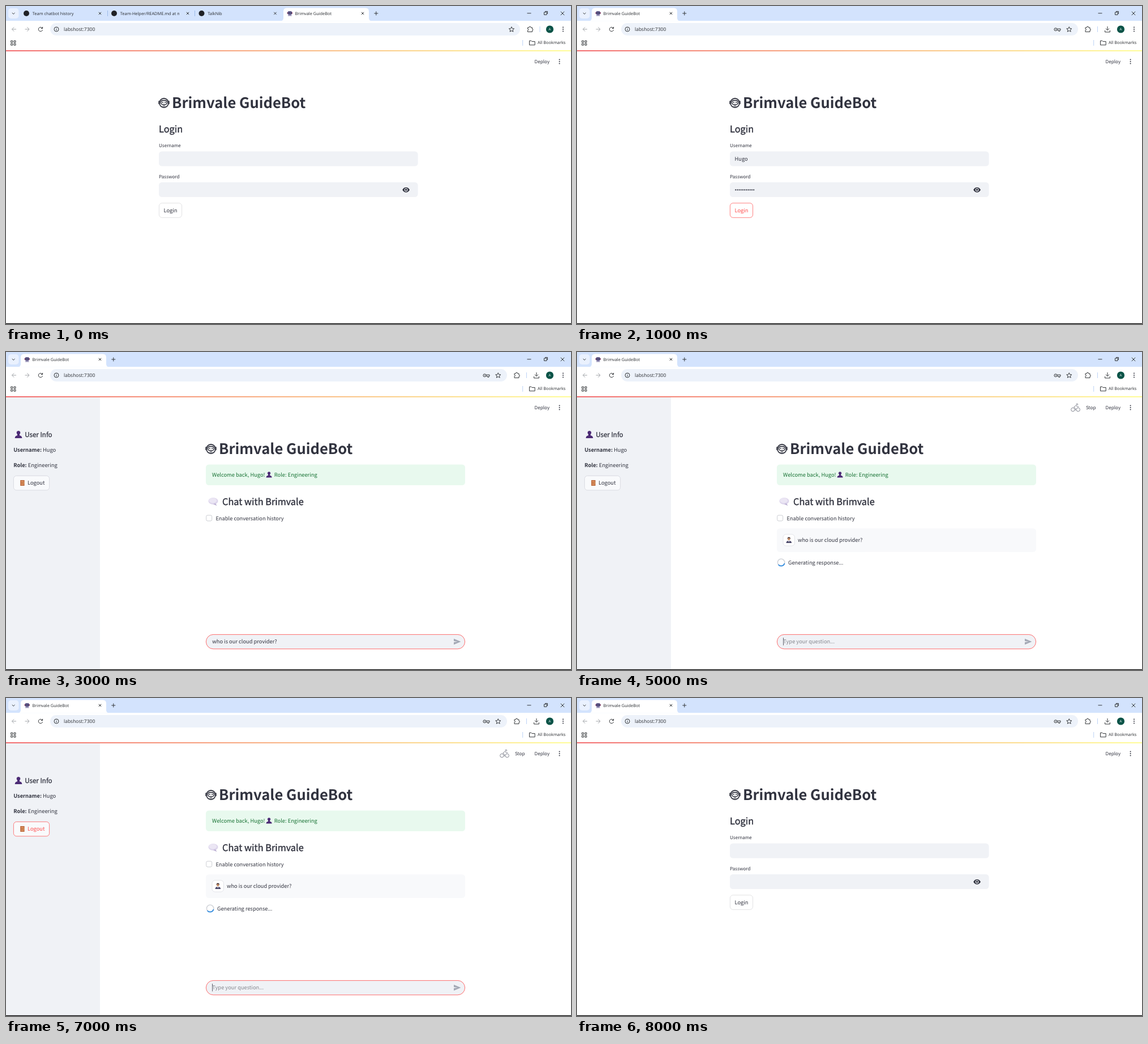
Write an HTML page that moves like this. It is 998 px wide and 561 px high and loops after 9000 ms.

```html
<!DOCTYPE html>
<html lang="en">
<head>
<meta charset="utf-8">
<title>Chat demo</title>
<style>
  html, body { margin: 0; width: 100%; height: 100%; overflow: hidden; background: #fff; }
  svg { display: block; width: 100vw; height: 100vh; }
  text {
    font-family: "Noto Sans CJK JP", "Noto Sans CJK SC", "Noto Sans CJK", "Noto Sans", sans-serif;
    fill: #31333f; text-rendering: geometricPrecision; white-space: pre;
  }
  .ui { font-family: "Open Sans", "Noto Sans", sans-serif; fill: #2a2d31; }
  .b { font-weight: 700; }
  /* Between regular and bold */
  .s { stroke: #31333f; stroke-width: .025em; }
  .line { fill: none; stroke: #333639; stroke-width: 1; }
</style>
</head>
<body>
<svg id="stage" viewBox="0 0 998 561" preserveAspectRatio="none"></svg>
<script>
const STEP = 1000, COUNT = 9;
const BOT = 'Brimvale GuideBot', USER = 'Hugo', INK = '#31333f', RED = '#ff4b4b';

const text = (x, y, str, size = 9.3, attrs = '') =>
  `<text x="${x}" y="${y}" font-size="${size}" ${attrs}>${str}</text>`;
const ui = (x, y, str, size = 7.4, attrs = '') => text(x, y, str, size, `class="ui" ${attrs}`);
const bold = str => `<tspan class="b">${str}</tspan>`;
const rect = (x, y, w, h, r, fill, attrs = '') =>
  `<rect x="${x}" y="${y}" width="${w}" height="${h}" rx="${r}" fill="${fill}" ${attrs}/>`;
const circle = (x, y, r, fill, attrs = '') => `<circle cx="${x}" cy="${y}" r="${r}" fill="${fill}" ${attrs}/>`;
const line = (d, attrs = '') => `<path class="line" d="${d}" ${attrs}/>`;
const shape = (d, fill) => `<path d="${d}" fill="${fill}"/>`;
const at = (x, y, body) => `<g transform="translate(${x} ${y})">${body}</g>`;
// Visible only in the listed steps.
const on = (steps, body) => `<g data-on="${steps}">${body}</g>`;
const dots = (x, y) => [-3.4, 0, 3.4].map(d => circle(x, y + d, 1, INK)).join('');
const cross = (x, y, r) => line(`M${x - r} ${y - r}l${2 * r} ${2 * r}m0 ${-2 * r}l${-2 * r} ${2 * r}`);

// Browser window
const tabShape = x => shape(`M${x - 5} 26.2q5 0 5-5V9.5q0-6 6-6h139q6 0 6 6v11.7q0 5 5 5z`, '#fff');
const botFace = (x, y) => at(x, y,
  shape('M-3.4 4.6q0-2.4 3.4-2.4t3.4 2.4z', '#8a84ad') + rect(-4.8, -2, 9.6, 2.8, 1, '#b3455c') +
  rect(-3.9, -3.8, 7.8, 6, 2.2, '#5a4f86') + rect(-3, -2.2, 6, 2.8, 1.2, '#2b2650') +
  circle(-1.4, -.8, .7, '#d9e4ff') + circle(1.4, -.8, .7, '#d9e4ff'));
const activeTab = x => tabShape(x) + botFace(x + 11.3, 13) + ui(x + 20.5, 15.8, BOT) + cross(x + 140, 13, 2.2) +
  line(`M${x + 160.3} 13h7m-3.5-3.5v7`);
const idleTab = (x, label) => circle(x, 13, 5, '#202226') +
  ui(x + 10.8, 15.8, label, 7.4, `clip-path="url(#tab${x})"`) + cross(x + 130, 13, 2.2);
const clip = x => `<clipPath id="tab${x}"><rect x="${x}" y="0" width="115" height="26"/></clipPath>`;

const star = x => line(`M${x} 36.7l1.3 3 3.3.3-2.5 2.1.8 3.2-2.9-1.7-2.9 1.7.8-3.2-2.5-2.1 3.3-.3z`);
const puzzle = x => line(`M${x - 4} 38h2.5q0-2 1.5-2t1.5 2H${x + 4}v2.6q1.4 0 1.4 1.2t-1.4 1.2v2.6h-8v-2.6q1.5-.1 1.5-1.3t-1.5-1.3z`, 'stroke-width="1.2"');
const divider = x => line(`M${x} 36v10`, 'style="stroke:#bdd3f6"');
const omnibox = w => rect(78, 30, w, 22, 11, '#edf2fa');

const browser =
  rect(0, 0, 998, 26.2, 0, '#d3e3fd') + rect(4, 4, 18.5, 18, 5, '#eaf1fe') +
  line('M10.8 12l2.4 2.3 2.4-2.3', 'stroke-width="1.3"') +
  on('0', idleTab(36, 'Team chatbot history') + idleTab(191, 'Team-Helper/README.md at main') + idleTab(345.5, 'TalkNib') +
    line('M179.5 8v10M333.5 8v10', 'style="stroke:#9dbbe9"') + activeTab(490)) +
  on('12345678', activeTab(26)) +
  line('M920.5 12.8h7M950.5 11h4.5v4.5h-4.5zm1.5-1.5h4.5v4.5') + cross(983, 13, 3.2) +
  line('M18 41h-7.5m3.7-3.7L10.5 41l3.7 3.7M33.5 41H41m-3.7-3.7L41 41l-3.7 3.7', 'style="stroke:#a2a5a9"') +
  line('M64.2 39.2a3.7 3.7 0 1 0 .4 2.9M64.6 36.8v2.8h-2.8', 'stroke-width="1.2"') +
  on('0', omnibox(830) + star(893) + puzzle(925.5) + divider(943)) +
  on('12345678', omnibox(807) + star(869.3) + puzzle(902) + divider(919.5) +
    circle(845.4, 41.3, 2.5, 'none', 'stroke="#333639"') + circle(845.4, 41.3, .8, '#333639') +
    line('M848 40.2h6v2.4h-1.2v1.8h-2v-1.8H848') +
    line('M937 36v6.5m-3-2.8l3 3 3-3M932.6 43v3h8.8v-3', 'stroke-width="1.2"')) +
  circle(89, 41, 4, 'none', 'stroke="#333639"') + line('M89 40.5v2.8M89 38.6v1') +
  ui(102, 44.3, 'labshost:7300', 8.5) +
  circle(960.5, 41, 6.6, '#0a5347') + ui(960.5, 43.1, 'A', 6, 'text-anchor="middle" style="fill:#fff"') + dots(984, 41) +
  line('M8.7 61.2h3v3h-3zm5.3 0h3v3h-3zm-5.3 5h3v3h-3zm5.3 0h3v3h-3z') +
  line('M912.7 60v10', 'style="stroke:#bdd3f6"') +
  line('M924.5 61.3h3.3l1.2 1.3h5.2v6.2h-9.7z') + ui(939, 67.4, 'All Bookmarks');

// Page parts
const robot = at(279, 171,
  circle(0, 0, 8, 'none', `stroke="${INK}" stroke-width="1.8"`) +
  shape('M-8-3.5h-1.7v5.5H-8zM8-3.5h1.7v5.5H8z', INK) +
  rect(-5.6, -4.4, 11.2, 7.2, 3.6, '#fff', `stroke="${INK}" stroke-width="1.6"`) +
  line('M-3.6-.2q1.2-2.4 2.4 0M1.2-.2q1.2-2.4 2.4 0', `style="stroke:${INK};stroke-width:1.3"`) +
  line('M-2.2 5.2h4.4', `style="stroke:${INK};stroke-width:1.2"`));
const heading = robot + text(293, 180.3, BOT, 25.6, 'class="b"');
const person = (x, y, scale = 1) => `<g transform="translate(${x} ${y}) scale(${scale})">` +
  shape('M-6.3 6.3q0-4 4.3-4.7l0-2Q-3.6-2-3.3-4-2.8-6.5 0-6.5T3.3-4Q3.6-2 2-.4v2q4.3.7 4.3 4.7z', '#4c2b75') + '</g>';
const field = y => rect(270, y, 457.6, 26, 5.2, '#f0f2f6');
const loginButton = (ink, edge) => rect(270.4, 347.7, 40.2, 25.6, 5.2, '#fff', `stroke="${edge}" stroke-width=".7"`) +
  text(290.5, 363.7, 'Login', 9.3, `text-anchor="middle" style="fill:${ink}"`);

const login = heading +
  text(270, 223.4, 'Login', 16.3, 'class="s"') +
  text(270, 249.4, 'Username', 8.14) + field(256.6) +
  text(270, 304, 'Password', 8.14) + field(311) +
  shape('M700.2 324.3q2.2-4.4 6.4-4.4t6.4 4.4q-2.2 4.4-6.4 4.4t-6.4-4.4z', INK) +
  circle(706.6, 324.3, 2.9, '#f0f2f6') + circle(706.6, 324.3, 1.8, INK) +
  on('08', loginButton(INK, '#d6d6d9')) +
  on('1', loginButton(RED, RED) + text(278.5, 273, USER) +
    Array.from({ length: 11 }, (_, i) => circle(280.2 + i * 3.2, 324.4, 1.1, INK)).join(''));

const logout = (ink, edge) => rect(13.4, 218.4, 63.2, 25.4, 5.2, '#f9fafc', `stroke="${edge}" stroke-width=".7"`) +
  rect(25.2, 226, 7.4, 10, .5, '#b9683c') + rect(26.4, 227.2, 5, 3.2, .3, '#d68a59') +
  rect(26.4, 231.6, 5, 3.2, .3, '#d68a59') + circle(31.6, 231, .6, '#f3d36b') +
  text(38, 234.4, 'Logout', 9.3, `style="fill:${ink}"`);
const sidebar = rect(0, 80, 166, 480, 0, '#f0f2f6') +
  person(22, 145.6) + text(33.2, 150.4, 'User Info', 11.6, 'class="s"') +
  text(13.2, 175.7, `${bold('Username:')} ${USER}`) + text(13.2, 202.7, `${bold('Role:')} Engineering`) +
  on('23456', logout(INK, '#d0d2d9')) + on('7', logout(RED, RED));

const green = 'style="fill:#177233"';
const welcome = at(83, 0, heading) + rect(353, 198.6, 458, 36.4, 5.2, '#e8f9ee') +
  text(364, 219.9, `Welcome back, ${USER}!`, 9.3, green) + person(464.6, 216.4, .8) +
  text(473.8, 219.9, 'Role: Engineering', 9.3, green) +
  '<ellipse cx="366" cy="263" rx="8.6" ry="6" fill="#ded6ec"/>' + shape('M370 267l2.6 4.2-6.6-2.7z', '#bdb1d4') +
  '<ellipse cx="365.2" cy="262" rx="7" ry="4.4" fill="#ebe6f4"/>' +
  text(382, 270.4, 'Chat with Brimvale', 16.3, 'class="s"') +
  rect(353.7, 288, 10, 10, 2.4, '#fff', 'stroke="#c7c9cf" stroke-width=".9"') +
  text(370.4, 296.5, 'Enable conversation history');

const avatar = (x, y) => rect(x, y, 20.4, 20.4, 5.2, '#fff', 'stroke="#dcdee4" stroke-width=".8"');
const QUESTION = 'who is our cloud provider?';
const message = rect(353, 311.3, 458, 41.4, 5.2, '#f8f9fb') + avatar(364, 321.6) +
  at(374.3, 331.8, shape('M-4.8 5.2q0-4 4.8-4t4.8 4z', '#4d4a6b') + shape('M-1 1h2l-1 3z', '#fff') +
    circle(0, -1.8, 2.3, '#c99068') + shape('M-2.6-1.8q-.3-3.6 2.6-3.6t2.6 3.6q-1-2-2.6-2t-2.6 2z', '#3c2a2c')) +
  text(390, 335.2, QUESTION);

const pill = (edge, value) =>
  rect(353.4, 498.4, 457.2, 25.4, 12.7, '#f0f2f6', edge ? `stroke="${RED}" stroke-width=".8"` : '') +
  (value ? text(364.3, 514, value) : text(364.3, 514, 'Type your question...', 9.3, 'style="fill:#85878e"')) +
  shape('M791 505.7l12.4 5.3-12.4 5.3v-4.2l7-1.1-7-1.1z', '#a3a8b4');
const caret = line('M364.6 504v13.5', `style="stroke:${INK};stroke-width:.8"`);

const spinner = circle(360.6, 371.2, 6.2, 'none', 'stroke="#d5d7dc" stroke-width="1.7"') +
  '<path id="arc" d="M366.6 372.8A6.2 6.2 0 0 1 355.6 374.9" fill="none" stroke="#2f8be0" stroke-width="1.7"/>' +
  text(373, 374.8, 'Generating response...');
const grey = 'style="stroke:#777a86;stroke-width:.9"';
const cyclist = line('M872.7 101.6a3.2 3.2 0 1 0 6.4 0a3.2 3.2 0 1 0-6.4 0M882 101.6a3.2 3.2 0 1 0 6.4 0a3.2 3.2 0 1 0-6.4 0M880.5 103v-3.5l-2.8-2.3 3.6-3 2 2.3h3', grey) +
  circle(883.3, 92.4, 1.3, 'none', grey);
const runner = line('M875.5 97.5l2.2-2.7 4 .6-2 4 2.8 2-.6 3.8M879.5 99.6l-1.5 2.8h-3.6M881.8 95.4l2 2.4 3-.6', grey) +
  circle(883, 92.4, 1.4, 'none', grey);

const answer = (() => {
  const x = 387, item = (y, str) => circle(390.2, y - 3.4, 1.6, INK) + text(402, y, str);
  const services = ['ZV2 (compute instances)', 'ZKS (container management)', 'Runlet (serverless functions)',
    'ZDS (managed databases)', 'Z3 (object storage)', 'EdgeSprout (CDN)'];
  return at(-3, -229.5, message) + avatar(361, 143.8) +
    at(371.2, 154, '<ellipse rx="4" ry="3.3" fill="#666873"/>' + rect(-3, -1.8, 6, 2.6, 1.2, '#fff') +
      circle(-1.2, -.6, .7, INK) + circle(1.2, -.6, .7, INK)) +
    text(x, 155.4, 'Based on the provided context, your cloud provider is:') +
    text(x, 182.4, 'ZWS (Zelmor Web Services)', 9.3, 'class="b"') +
    text(x, 222.8, 'Key Details:', 16.3, 'class="s"') +
    item(251.4, `${bold('Primary Cloud Provider')}: Used for all core infrastructure`) +
    item(270.1, `${bold('Services Utilized')}:`) +
    services.map((str, i) => circle(405.3, 285.5 + i * 18.7, 1.5, 'none', `stroke="${INK}" stroke-width=".7"`) +
      text(417, 288.9 + i * 18.7, str)).join('') +
    text(x, 409.4, `This is specified in the "Infrastructure" section (2.3.5). For operational issues, contact ${bold('Server')}`) +
    text(x, 426, `${bold('Helpers')} (<tspan fill="#0068c9" text-decoration="underline">help@brimvale.test</tspan>, SLA: 2 hours).`) +
    text(x, 453, 'Last Updated: May 14, 2025.') +
    rect(390, 471.8, 7.6, 9.2, .6, '#dcd8e8') + line('M391.5 474h4.5m-4.5 2h4.5m-4.5 2h4.5', 'style="stroke:#a49dbb;stroke-width:.6"') +
    text(403, 480, `${bold('Sources:')} engineering/engineering_master_doc.md`) +
    at(-3, 0, pill(true)) +
    rect(992.8, 233, 3.6, 308, 1.8, '#8b8b8b') + shape('M992.3 84l2.3-3 2.3 3zM992.3 556l2.3 3 2.3-3z', '#8b8b8b');
})();

document.getElementById('stage').innerHTML =
  `<defs>${[36, 191, 345.5].map(clip).join('')}
    <linearGradient id="bar"><stop stop-color="#f04a4e"/><stop offset="1" stop-color="#fffd80"/></linearGradient>
  </defs>` + rect(0, 0, 998, 561, 0, '#fff') + browser +
  on('018', login) +
  on('234567', sidebar) +
  on('23457', welcome) +
  on('2', pill(false)) +
  on('3', pill(true, QUESTION)) +
  on('457', message + spinner + pill(true) + caret + text(899, 101.2, 'Stop', 8.14)) +
  on('4', runner) + on('57', cyclist) +
  on('6', answer) +
  text(933.6, 101.2, 'Deploy', 8.14) + dots(977.6, 98) +
  rect(0, 78.2, 998, 1.6, 0, 'url(#bar)') + rect(0, 559.8, 998, 1.2, 0, '#000');

const parts = [...document.querySelectorAll('[data-on]')];
const arc = document.getElementById('arc');

function draw(time) {
  const step = Math.floor(time / STEP) % COUNT;
  for (const part of parts) part.style.display = part.dataset.on.includes(step) ? '' : 'none';
  arc.setAttribute('transform', `rotate(${step === 4 ? -110 : 0} 360.6 371.2)`);
}

const start = performance.now();
function loop() {
  draw(performance.now() - start);
  requestAnimationFrame(loop);
}
loop();
</script>
</body>
</html>
```
